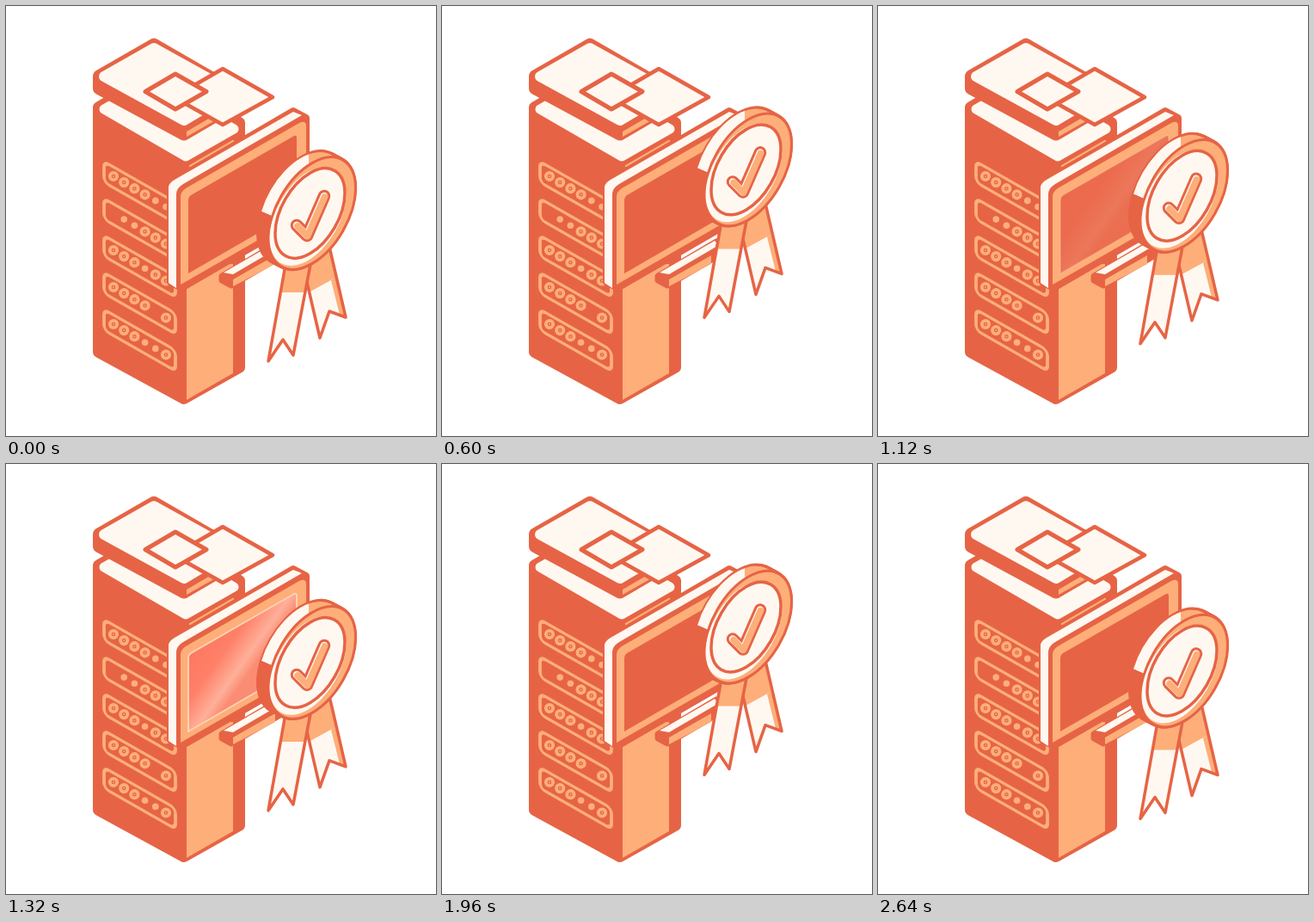
Animation of 500 by 500 pixels, one loop 2680 ms. Source, as an HTML page with a canvas:

```html
<!DOCTYPE html>
<html lang="en">
<head>
<meta charset="utf-8">
<title>Server with award</title>
<style>
html, body { margin: 0; width: 100%; height: 100%; overflow: hidden; background: #fff; }
canvas { display: block; }
</style>
</head>
<body>
<canvas id="stage" width="500" height="500"></canvas>
<script>
const ctx = document.getElementById('stage').getContext('2d');
const RED = '#e66445', ORANGE = '#fdae79', CREAM = '#fff8f1';
const LOOP = 2680, HALF = LOOP / 2, STEP = 40;
ctx.lineJoin = ctx.lineCap = 'round';

function paint(path, fill, stroke, width) {
  if (fill) { ctx.fillStyle = fill; ctx.fill(path); }
  if (stroke) { ctx.strokeStyle = stroke; ctx.lineWidth = width; ctx.stroke(path); }
}

function shape(d, fill, stroke, width) {
  paint(new Path2D(d), fill, stroke, width);
}

function dot(x, y, r, fill, stroke, width) {
  const path = new Path2D();
  path.arc(x, y, r, 0, 7);
  paint(path, fill, stroke, width);
}

// Circle of half-width r lying on the right-facing isometric plane
function disc(x, y, r, fill, stroke, width) {
  const path = new Path2D(), circle = new Path2D();
  circle.arc(0, 0, r, 0, 7);
  path.addPath(circle, new DOMMatrix([1, -0.577, 0, 1.155, x, y]));
  paint(path, fill, stroke, width);
}

// Rim of the badge, optionally limited to a clip outline
function rim(x, y, r, color, clip) {
  ctx.save();
  if (clip) ctx.clip(new Path2D(clip));
  for (let k = 0; k <= 1; k += 1 / 14) disc(x - 13 * (1 - k), y - 7 * (1 - k), r, color);
  ctx.restore();
}

// O = ring, o = small light, space = empty
function lights(pattern, y) {
  ctx.save();
  ctx.transform(1, 0.57, 0, 1, 114, y);
  const frame = new Path2D();
  frame.roundRect(0, 0, 83, 24, 6);
  paint(frame, null, ORANGE, 3.8);
  ctx.restore();
  [...pattern].forEach((kind, i) => {
    const cx = 125 + i * 12.2, cy = y + 17 + i * 7.1;
    if (kind === 'o') dot(cx, cy, 3.8, ORANGE);
    if (kind === 'O') {
      dot(cx, cy, 4.2, RED, ORANGE, 3.8);
      dot(cx, cy, 1, ORANGE);
    }
  });
}

function server() {
  shape('M108 118L170 82L271 136V420L207 456L108 402Z', RED, RED, 14);
  shape('M114 120L170 88L265 143L209 175Z', CREAM, CREAM, 11);
  shape('M214 186L264 157', null, ORANGE, 2.5);
  shape('M210 300H264V427L210 458Z', ORANGE);
  ['OOOOoo', ' ooOOO', 'OOOoOO', 'OOOO O', 'OOOooO'].forEach((p, i) => lights(p, 181 + i * 43));

  shape('M109 82L172 45.6L269 101.6V112L207 148.4L109 95.5Z', RED, RED, 16);
  shape('M114 82L172 49L263 99.5L207 133Z', CREAM, CREAM, 12);
  shape('M210 146L268 112V119L210 152Z', ORANGE);
  shape('M252 73L310 106L252 138L195 106Z', CREAM, RED, 4.6);
  shape('M197 79L233 99.5L197 120L162 99.5Z', CREAM, RED, 5);
}

function monitor(glow) {
  shape('M251 314L319 274L322 290L262 325L251 319Z', RED, RED, 7);
  shape('M253 310L317 273L322 278L264 312Z', CREAM);
  shape('M264 318L313 290V300L264 326Z', ORANGE);

  shape('M191 209L197 202L334 122L349 130V244L204 328L191 321Z', RED, RED, 8);
  shape('M189 211Q189 206 196 202L334 123L344 127L206 207Q198 212 198 219V328L189 322Z', CREAM);
  shape('M203 222Q203 216 209 212L341 136Q349 132 349 140V240L203 324Z', ORANGE);

  const screen = 'M212 225Q212 222 215 220L335 151Q338 150 338 153V238L212 311Z';
  shape(screen, RED);
  if (glow <= 0) return;
  const shine = ctx.createLinearGradient(215, 205, 320, 280);
  [[0, '#ff7560'], [0.3, '#ff8068'], [0.5, '#ffb09a'], [0.6, '#fa8d74'], [1, '#ff8a70']]
    .forEach(([at, color]) => shine.addColorStop(at, color));
  ctx.globalAlpha = glow;
  shape(screen, shine, '#ffd3b5', 2);
  ctx.globalAlpha = 1;
}

function ribbons() {
  const left = 'M326 295L305 413L322 388L334 406L355 295Z';
  const right = 'M345 300L365 386L376 355L395 362L376 280Z';
  shape(right, CREAM);
  shape('M345 300L352 333L383 316L375 280Z', ORANGE);
  shape('M378 319L388 359L395 361L384 315Z', ORANGE);
  shape(right, null, RED, 3.5);
  shape(left, CREAM);
  shape('M326 295L319 333H347L355 295Z', ORANGE);
  shape(left, null, RED, 3.5);
}

function badge(dy) {
  const x = 356, y = 241;
  ctx.save();
  ctx.translate(0, dy);
  ribbons();
  rim(x, y, 52, RED);
  rim(x, y, 49.5, ORANGE);
  rim(x, y, 49.5, CREAM, 'M280 150H352V250H280Z');
  rim(x, y, 51, RED, 'M280 231L312 246V320H280Z');

  disc(x, y, 50.5, ORANGE, RED, 3);
  disc(351, 244.5, 44.5, CREAM);
  disc(353.5, 241, 40.5, CREAM, RED, 3.5);
  shape('M338 255L350 267L370 221', null, RED, 14.5);
  shape('M338 255L350 267L370 221', null, CREAM, 8.5);
  shape('M339 256L350.5 267.5L370.5 222', null, ORANGE, 7.5);
  ctx.restore();
}

function draw(now) {
  const t = Math.floor(now / STEP) * STEP % LOOP;
  // Two bounces: the middle landing stops 10px above the first
  const low = Math.abs(t - HALF) < HALF / 2 ? 10 : 0;
  const lift = low + (52 - low) * Math.sin(Math.PI * t / HALF) ** 2;
  const away = Math.min(1, Math.abs(t - HALF) / 330);
  const glow = (1 + Math.cos(Math.PI * away)) / 2;

  ctx.fillStyle = '#fff';
  ctx.fillRect(0, 0, 500, 500);
  server();
  monitor(glow);
  badge(-lift);
  requestAnimationFrame(draw);
}

requestAnimationFrame(draw);
</script>
</body>
</html>
```
